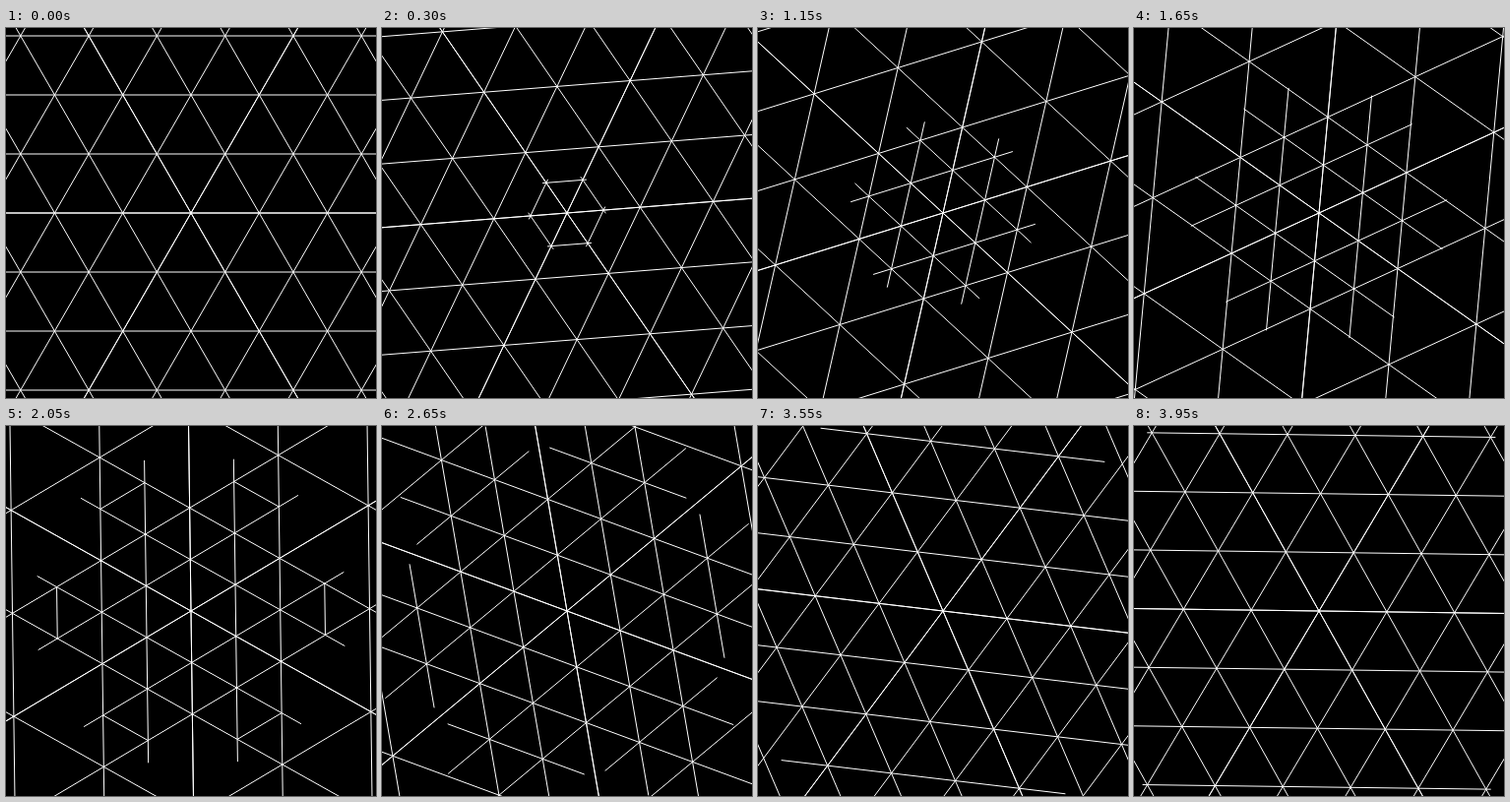
An HTML page that plays this animation: 376x376 px, repeating every 4 s.

```html
<!DOCTYPE html>
<html>
<head>
<meta charset="utf-8">
<title>Triangle grid</title>
<style>
  html, body { margin: 0; width: 100%; height: 100%; overflow: hidden; background: #000; }
  svg { display: block; width: 100vw; height: 100vh; }
  line { stroke: #fff; stroke-width: 1; }
</style>
</head>
<body>
<svg viewBox="0 0 376 376"></svg>
<script>
const DURATION = 4000, STEP = 50;
const CENTER = 188, SPACING = 60, REACH = 400;
const svg = document.querySelector('svg');
const lines = [];

// offset is measured in grid rows; halfLength gives the reach at progress t
function addLine(angle, offset, halfLength) {
  const el = document.createElementNS('http://www.w3.org/2000/svg', 'line');
  svg.appendChild(el);
  lines.push({ el, angle, offset, halfLength });
}

const full = () => REACH;
const growInner = t => 300 * t;
const growOuter = t => Math.max(0, 316.8 * (t - 3 / 7));

for (const angle of [0, 60, 120]) {
  for (const side of [-1, 1]) {
    // both sides include row 0, so the central lines are brighter
    for (let row = 0; row <= 4; row++) addLine(angle, side * row, full);
    addLine(angle, side * 0.5, growInner);
    addLine(angle, side * 1.5, growOuter);
  }
}

function render(time) {
  const t = Math.floor((time % DURATION) / STEP) * STEP / DURATION;
  const spacing = SPACING * (1 + t);
  for (const { el, angle, offset, halfLength } of lines) {
    const a = (angle - 60 * t) * Math.PI / 180;
    const dx = Math.cos(a), dy = Math.sin(a);
    const x = CENTER - dy * offset * spacing;
    const y = CENTER + dx * offset * spacing;
    const half = halfLength(t);
    el.setAttribute('x1', x - dx * half);
    el.setAttribute('y1', y - dy * half);
    el.setAttribute('x2', x + dx * half);
    el.setAttribute('y2', y + dy * half);
    el.setAttribute('visibility', half > 0 ? 'visible' : 'hidden');
  }
}

const start = performance.now();
function tick() {
  render(performance.now() - start);
  requestAnimationFrame(tick);
}
render(0);
requestAnimationFrame(tick);
</script>
</body>
</html>
```
